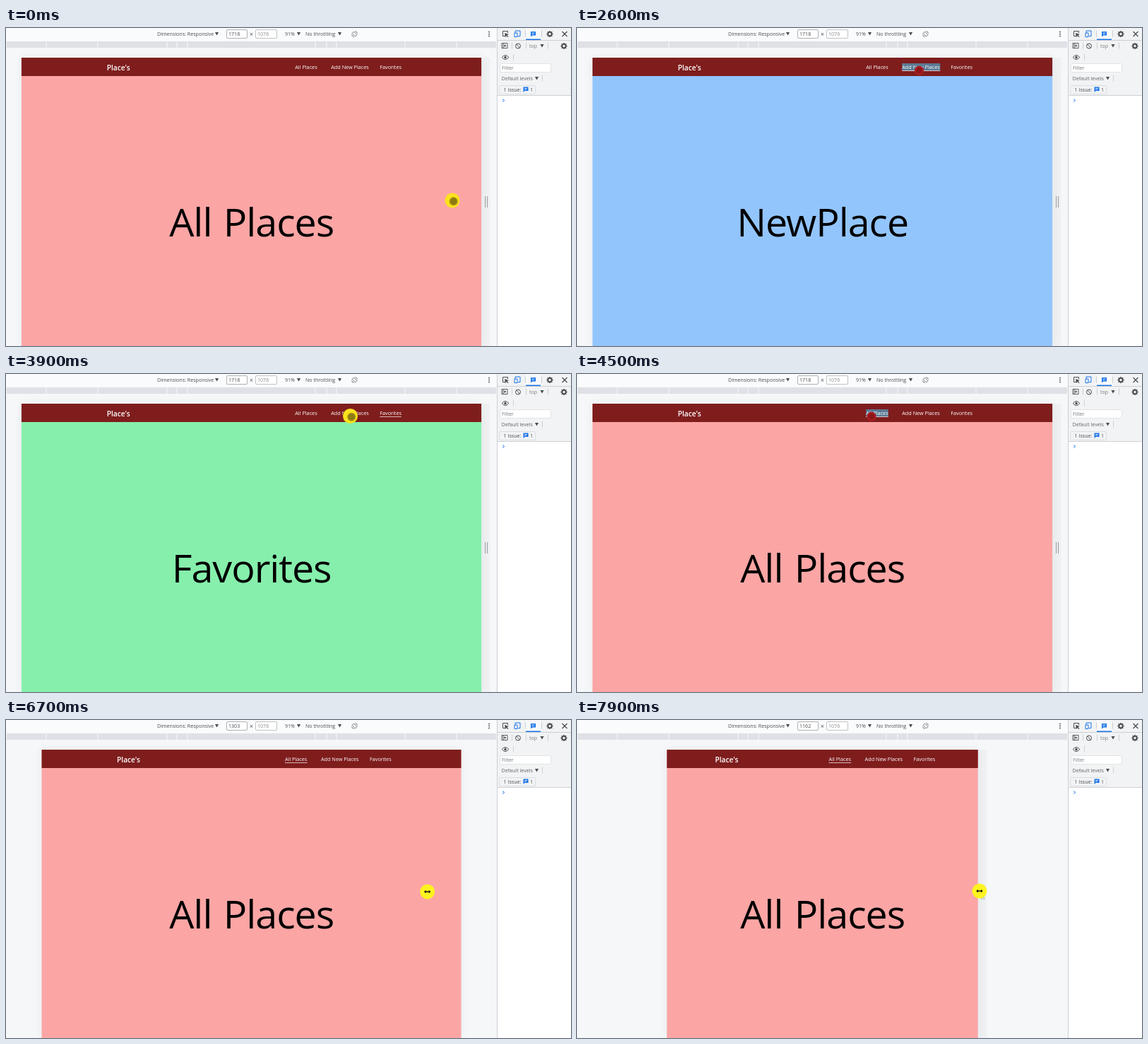
Recreate the animation shown at these times as an HTML page with a canvas. Size 800 by 450 pixels, loop 8000 ms.

```html
<!DOCTYPE html>
<html lang="en">
<head>
<meta charset="utf-8">
<title>Responsive places page</title>
<style>
html, body { margin: 0; width: 100%; height: 100%; overflow: hidden; }
canvas { display: block; width: 800px; height: 450px; }
</style>
</head>
<body>
<canvas id="stage" width="800" height="450"></canvas>
<script>
const c = document.getElementById('stage').getContext('2d');
const LOOP = 8000, CENTER = 347.5, SCALE = 0.379;
const INK = '#4a4d51', LINE = '#cdd0d4', BLUE = '#1a73e8';

const PAGES = [
  { title: 'All Places', color: '#fca5a5', dx: 0, width: 31.5 },
  { title: 'NewPlace', color: '#93c5fd', dx: 51, width: 54 },
  { title: 'Favorites', color: '#86efac', dx: 120, width: 30.5 }
];
const LINKS = ['All Places', 'Add New Places', 'Favorites'];

// Each tap: press time, release time, link
const TAPS = [[1300, 1500, 0], [2400, 2700, 1], [3200, 3500, 2], [4300, 4600, 0]];

const POINTER = [
  [0, 632, 244], [200, 632, 244], [800, 540, 62], [1300, 424, 57], [1600, 404, 54.5],
  [1900, 404, 54.5], [2400, 483, 59], [2700, 483, 59], [3200, 542, 58], [3500, 542, 58],
  [3900, 487.5, 59.5], [4300, 415.5, 59], [4700, 415.5, 59], [5400, 675.5, 244],
  [6500, 597, 243], [7900, 569.5, 242]
];
const DEVICE = [[0, 1718], [5600, 1718], [6500, 1303], [7200, 1303], [7700, 1162]];
// The page repaints later than the device width changes
const REPAINTS = [[0, 1718], [6100, 1567], [6900, 1303], [7700, 1162]];

function sample(keys, t, i = 1) {
  const n = keys.findIndex(k => k[0] > t);
  if (n < 0) return keys[keys.length - 1][i];
  const a = keys[n - 1], b = keys[n], u = (t - a[0]) / (b[0] - a[0]);
  return a[i] + (b[i] - a[i]) * u * u * (3 - 2 * u);
}

function rect(x, y, w, h, color) {
  c.fillStyle = color;
  c.fillRect(x, y, w, h);
}

function text(s, x, y, size = 7.1, color = INK, weight = 400) {
  c.font = `${weight} ${size}px "Open Sans", "Noto Sans", sans-serif`;
  c.fillStyle = color;
  c.fillText(s, x, y);
}

function heading(s) {
  c.save();
  c.textAlign = 'center';
  c.letterSpacing = '-1px';
  c.wordSpacing = '3px';
  text(s, 347.7, 295, 55.5, '#000');
  c.restore();
}

function circle(x, y, r, color) {
  c.fillStyle = color;
  c.beginPath();
  c.arc(x, y, r, 0, 7);
  c.fill();
}

function stroke(d, x = 0, y = 0, color = INK, width = 1) {
  c.save();
  c.translate(x, y);
  c.strokeStyle = color;
  c.lineWidth = width;
  c.stroke(new Path2D(d));
  c.restore();
}

function fill(d, x, y, color = INK) {
  c.save();
  c.translate(x, y);
  c.fillStyle = color;
  c.fill(new Path2D(d));
  c.restore();
}

function box(x, y, w, h, bg, border, r = 1.5) {
  c.beginPath();
  c.roundRect(x + .5, y + .5, w - 1, h - 1, r);
  c.fillStyle = bg;
  c.fill();
  c.strokeStyle = border;
  c.lineWidth = 1;
  c.stroke();
}

const arrow = (x, y) => fill('M-2.6 -2H2.6L0 2.4Z', x, y);
const divider = (x, y) => rect(x, y - 4.5, 1, 9, LINE);

function gear(x, y) {
  for (let i = 0; i < 8; i++) {
    const a = i * Math.PI / 4, p = r => `${r * Math.cos(a)} ${r * Math.sin(a)}`;
    stroke(`M${p(3)}L${p(4.6)}`, x, y, INK, 1.6);
  }
  circle(x, y, 3.6, INK);
  circle(x, y, 1.7, '#f1f3f4');
}

function chat(x, y) {
  fill('M-3.5 -3.5H3.5V2H-1.5L-3.5 4Z', x, y, BLUE);
  rect(x - 2, y - 2, 4, .7, '#fff');
  rect(x - 2, y - .3, 3, .7, '#fff');
}

function drawToolbar(width) {
  rect(0, 0, 695, 450, '#f5f7f9');
  rect(0, 0, 695, 18, '#fafbfc');
  rect(1, 19, 693, 9, '#dfe1e6');
  for (const x of [57, 130, 228, 242, 257, 438, 454, 468, 565, 638]) rect(x - .5, 19, 1, 9, '#f5f7f9');
  text('Dimensions: Responsive', 214, 11);
  arrow(298.5, 8);
  box(312, 2, 30, 13, '#fff', '#aeb1b5');
  text(width, 315, 11);
  text('×', 345, 12, 8.5);
  box(353, 2, 31, 13, '#fff', '#bfc2c5');
  text('1076', 356, 11, 7.1, '#85888c');
  text('91%', 395, 11);
  arrow(414.5, 8);
  text('No throttling', 424, 11);
  arrow(472.5, 8);
  stroke('M-3.5 -1L-1 -3.5L3.5 1L1 3.5ZM1 -4A4 4 0 0 1 4 -1M-1 4A4 4 0 0 1 -4 1', 493.5, 8.5, INK, .8);
  for (const y of [5.5, 8.5, 11.5]) circle(684, y, .9, INK);
}

function drawPanel() {
  rect(695, 0, 105, 450, '#fff');
  rect(696, 0, 104, 96, '#f1f3f4');
  rect(695, 0, 1, 450, LINE);
  rect(696, 17, 104, 1, LINE);
  rect(696, 95, 104, 1, LINE);

  stroke('M0 3.5H-3.5V-3.5H3.5V-1', 707, 8);
  fill('M-1 -1L5 1L2.5 2L4.5 4.5L3.5 5L1.5 3L0 5Z', 707, 8);
  stroke('M-3 -1V-4H4V3.5H1M-4 -1H0V4.5H-4Z', 724, 8, BLUE);
  divider(735, 8);
  rect(736, 0, 21, 17, '#f8f9fa');
  rect(736, 15.5, 21, 1.5, BLUE);
  chat(746.5, 8.5);
  divider(758, 8);
  gear(770, 8.5);
  stroke('M-3.5 -3.5L3.5 3.5M3.5 -3.5L-3.5 3.5', 791, 8.5, INK, 1.3);

  stroke('M-4 -3.5H4V3.5H-4ZM-2 -3.5V3.5', 706, 25, INK, .9);
  fill('M-.5 -2L2.5 0L-.5 2Z', 706, 25);
  divider(716, 25);
  stroke('M3.5 0A3.5 3.5 0 1 1 -3.5 0A3.5 3.5 0 1 1 3.5 0M-2.5 -2.5L2.5 2.5', 725, 25.5);
  divider(736, 25);
  text('top', 741, 28, 7.1, '#777a7e');
  arrow(759, 25);
  divider(767, 25);
  gear(790, 25.5);

  stroke('M-4.8 0Q0 -6 4.8 0Q0 6 -4.8 0Z', 707, 41.5);
  circle(707, 41.5, 1.7, INK);
  divider(718, 41);

  box(699, 50, 73, 13, '#fff', '#e1e3e6');
  text('Filter', 702, 59, 7.1, '#777a7e');
  text('Default levels', 701.5, 74, 7.1, '#62656a');
  arrow(751.5, 71);
  divider(759, 71);
  box(698, 81, 52, 13, '#f1f3f4', '#dcdfe2');
  text('1 Issue:', 704.5, 90);
  chat(736, 87);
  text('1', 742, 90);
  stroke('M-1.3 -2L1.2 0L-1.3 2', 704.5, 102.5, BLUE);
}

function drawPage(t, device, tap) {
  const edge = CENTER + device * SCALE / 2;
  rect(edge, 42, 12.5, 408, '#eff1f3');
  for (const x of [5, 8]) rect(edge + x, 238, 1, 16, '#9a9da1');

  const w = REPAINTS.findLast(r => r[0] <= t)[1] * SCALE, left = CENTER - w / 2;
  const page = PAGES[tap ? tap[2] : 0];
  c.save();
  c.shadowColor = 'rgba(0,0,0,.06)';
  c.shadowBlur = 14;
  rect(left, 42, w, 408, page.color);
  c.restore();
  rect(left, 42, w, 26, '#7f1d1d');
  text("Place's", CENTER - w / 4 - 42, 59.5, 10.2, '#fff', 600);

  const menu = CENTER + w / 4 - 101;
  const pressed = TAPS.find(p => t >= p[0] && t < p[1]);
  if (pressed) {
    const link = PAGES[pressed[2]];
    rect(menu + link.dx, 50, link.width, 11, '#5b7a94');
  }
  LINKS.forEach((s, i) => text(s, menu + PAGES[i].dx, 58, 7.25, '#fff'));
  if (tap && tap[0] > 2000) rect(menu + page.dx, 60, page.width, .8, '#f0dede');

  heading(page.title);

  if (t >= 1400 && t < 2000) {
    rect(22, 442, 216, 8, '#dcd6d8');
    text('Connecting...', 24, 447.5, 4.9, '#6b6b6e');
  }
  return pressed;
}

function drawPointer(t, device, pressed) {
  const x = t < 5600 ? sample(POINTER, t) : CENTER + device * SCALE / 2 + 2.2;
  const y = sample(POINTER, t, 2);
  if (pressed) {
    circle(x + 1.5, y + 1, 6.5, '#b21c22');
    circle(x + 1.5, y + 1, 4.5, '#8b171a');
    return;
  }
  circle(x, y, 10.5, t < 5400 ? '#fbe21d' : '#fdf31f');
  if (t < 5400) {
    circle(x + 1.7, y + 1.2, 6, '#a89413');
    circle(x + 1.7, y + 1.2, 4.7, '#8d7b12');
  } else {
    stroke('M-3 0H3', x, y, '#111', 1.4);
    fill('M-4.8 0L-2 -2.3V2.3ZM4.8 0L2 -2.3V2.3Z', x, y, '#111');
  }
}

function frame(now) {
  const t = Math.floor(now % LOOP / 100) * 100;
  const device = sample(DEVICE, t);
  const tap = TAPS.findLast(p => t >= p[0] + 100);
  drawToolbar(Math.round(device));
  const pressed = drawPage(t, device, tap);
  drawPanel();
  drawPointer(t, device, pressed);
  requestAnimationFrame(frame);
}
requestAnimationFrame(frame);
</script>
</body>
</html>
```
